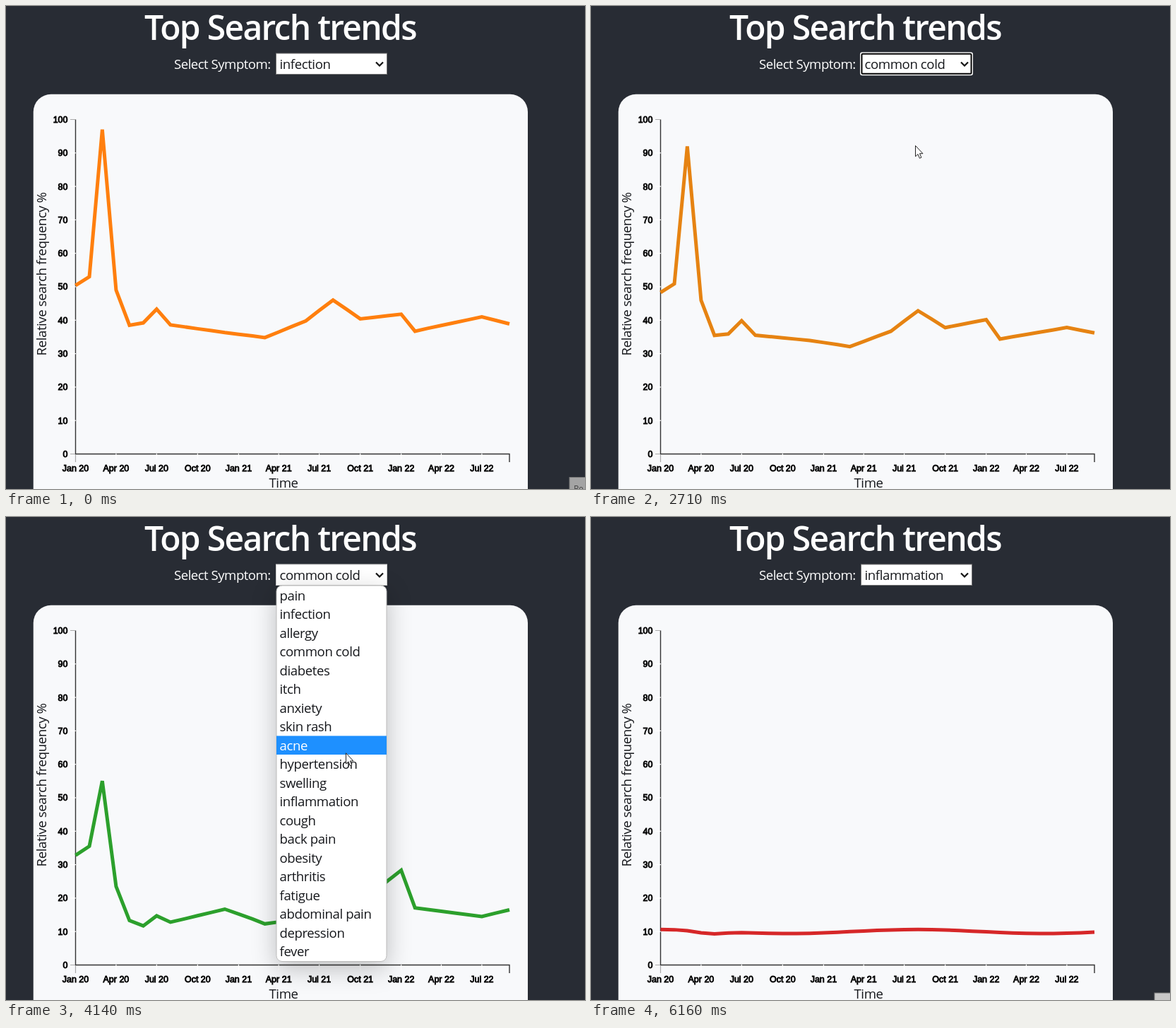
These frames come from a looping animation (820 by 683 pixels, 6.23 s). An HTML page:

```html
<!DOCTYPE html>
<html lang="en">
<head>
<meta charset="utf-8">
<title>Top Search trends</title>
<style>
  html, body { margin: 0; width: 100%; height: 100%; overflow: hidden; background: #282c34; }
  svg { display: block; width: 820px; height: 683px; }
  text { font: 18.6px "Open Sans", "Noto Sans", sans-serif; letter-spacing: -.4px; fill: #16181c; }
  .mid { text-anchor: middle; }
  .light { fill: #fff; }
  #title { font-size: 48px; font-weight: 600; letter-spacing: -1.7px; }
  #label { font-weight: 500; letter-spacing: -.5px; }
  .tick { font: 12.5px "Liberation Sans", Arial, sans-serif; letter-spacing: 0; fill: #000; stroke: #000; stroke-width: .85; }
  .axis { fill: none; stroke: #333; stroke-width: 1.4; }
  .faint { fill: none; stroke: #aaa; stroke-width: 1.2; }
  .notch { stroke: #fff; stroke-width: 1.2; }
  #menuBox { fill: #fff; stroke: #bbb; filter: drop-shadow(0 10px 17px rgba(0, 0, 0, .24)); }
</style>
</head>
<body>
<svg viewBox="0 0 820 683">
  <rect width="820" height="683" fill="#282c34"/>
  <text id="title" class="mid light" x="388.5" y="48">Top Search trends</text>
  <text id="label" class="light" x="238" y="89">Select Symptom:</text>
  <rect x="38.75" y="124.75" width="700.25" height="620" rx="25" fill="#f8f9fb"/>
  <path class="axis" d="M98.5 160.5V633.5H713V645"/>
  <path class="faint" d="M91 160.5H98M91 633.5H98M98.5 634V645"/>
  <g id="ticks"></g>
  <text class="mid" transform="translate(57 379) rotate(-90)">Relative search frequency %</text>
  <text class="mid" x="393" y="681">Time</text>
  <path id="line" fill="none" stroke-width="5"/>

  <rect id="select" x="382.5" y="67" width="157" height="29.5" fill="#fff"/>
  <g id="ring" fill="none">
    <rect x="381.75" y="66" width="158.5" height="31.5" rx="2.5" stroke="#fff" stroke-width="1.5"/>
    <rect x="383.5" y="67.7" width="155" height="28" rx="1.5" stroke="#101010" stroke-width="2"/>
  </g>
  <text id="choice" x="387.5" y="89"></text>
  <path d="M524 79.5l5 5 5-5" fill="none" stroke="#111" stroke-width="2.2"/>

  <g id="menu">
    <rect id="menuBox" x="383" y="97" width="156" height="531.5" rx="8"/>
    <rect id="hover" x="383" width="156" height="26.5" fill="#1e90ff"/>
    <g id="items"></g>
  </g>

  <g id="tip">
    <rect id="tipBox" width="40" height="30" stroke="#777"/>
    <text x="6" y="20" style="font-size:12px;fill:#444">Re</text>
  </g>
  <g id="pointer">
    <circle id="click" r="14" fill="#ff0" opacity=".6"/>
    <path d="M.5 .5V15.8L4 12.6 6.4 18.3 8.9 17.2 6.5 11.7H11Z" fill="#fff" stroke="#222"/>
  </g>
</svg>
<script>
const LOOP = 6230, ROW = 26.5, LIST_TOP = 97.5, MONTHS = 33;
const $ = id => document.getElementById(id);
const set = (id, name, value) => $(id).setAttribute(name, value);
const show = (id, on) => $(id).style.display = on ? '' : 'none';
const clamp = v => Math.max(0, Math.min(1, v));
const mix = (a, b, k) => a + (b - a) * k;
const within = (t, [a, b]) => t >= a && t < b;
const cubic = k => k < .5 ? 4 * k ** 3 : 1 - 4 * (1 - k) ** 3;
const smooth = k => k * k * (3 - 2 * k);

const symptoms = ['pain', 'infection', 'allergy', 'common cold', 'diabetes', 'itch', 'anxiety',
  'skin rash', 'acne', 'hypertension', 'swelling', 'inflammation', 'cough', 'back pain', 'obesity',
  'arthritis', 'fatigue', 'abdominal pain', 'depression', 'fever'];

// Curves turn at these months and run straight in between
const turns = [0, 1, 2, 3, 4, 5, 6, 7, 11, 14, 17, 19, 21, 24, 25, 30, 32];
const through = values => m => {
  const i = Math.max(1, turns.findIndex(turn => turn >= m));
  return mix(values[i - 1], values[i], (m - turns[i - 1]) / (turns[i] - turns[i - 1]));
};
const series = [
  { row: 1, rgb: [255, 127, 14], at: through(
    [50.4, 53, 97, 49, 38.5, 39.2, 43.3, 38.6, 36.3, 34.8, 39.8, 46, 40.4, 41.8, 36.7, 41, 38.9]) },
  { row: 3, rgb: [44, 160, 44], at: through(
    [32.8, 35.5, 55, 23.5, 13.3, 11.7, 14.7, 12.8, 16.7, 12.3, 14, 19.6, 18.7, 28.3, 17.1, 14.5, 16.5]) },
  { row: 11, rgb: [214, 39, 40],
    at: m => 10 + .6 * Math.cos(m / 3) - .9 * Math.exp(-((m - 3.7) ** 2) / 2) }
];

// Pointer glides: start, end, x, y
const glides = [[460, 460, 570, 268], [530, 530, 455, -8], [790, 1340, 452, 75], [1500, 2100, 459, 197],
  [3060, 3480, 499, 84], [3700, 4330, 476, 402], [5110, 5620, 725, 680]];
const clicks = [[1340, 1490], [2170, 2300], [3680, 3820], [4560, 4700]];
const menus = [[1490, 2440], [3680, 4830]];

const days = month => (Date.UTC(2020, month) - Date.UTC(2020, 0)) / 864e5;
const xAt = month => 98.5 + days(month) / days(MONTHS - 1) * 614.5;
const yAt = value => 633.5 - value * 4.73;

function buildTicks() {
  let out = '';
  for (let v = 0; v <= 100; v += 10) {
    const y = yAt(v);
    if (v % 100) out += `<path class="notch" d="M91 ${y}H99"/>`;
    out += `<text class="tick" text-anchor="end" x="87.5" y="${y + 4.4}">${v}</text>`;
  }
  for (let m = 0; m < MONTHS - 1; m += 3) {
    const x = xAt(m), name = ['Jan', 'Apr', 'Jul', 'Oct'][m / 3 % 4];
    if (m) out += `<path class="notch" d="M${x} 633V641"/>`;
    out += `<text class="tick mid" x="${x}" y="658">${name} ${20 + Math.floor(m / 12)}</text>`;
  }
  $('ticks').innerHTML = out;
}

function pointerAt(t) {
  let x = 0, y = 0;
  for (const [from, to, toX, toY] of glides) {
    if (t < from) break;
    const k = to > from ? smooth(clamp((t - from) / (to - from))) : 1;
    x = mix(x, toX, k);
    y = mix(y, toY, k);
  }
  return [x, y];
}

function drawLine(t) {
  const i = t < 4790 ? 0 : 1;
  const a = series[i], b = series[i + 1];
  const k = cubic(clamp((t - [2400, 4790][i]) / 1000));
  const points = Array.from({ length: MONTHS }, (_, m) =>
    `${xAt(m).toFixed(2)} ${yAt(mix(a.at(m), b.at(m), k)).toFixed(2)}`);
  set('line', 'd', 'M' + points.join('L'));
  set('line', 'stroke', `rgb(${a.rgb.map((c, n) => Math.round(mix(c, b.rgb[n], k)))})`);
}

function draw(t) {
  drawLine(t);
  const [x, y] = pointerAt(t);
  show('pointer', within(t, [460, 5560]));
  set('pointer', 'transform', `translate(${x} ${y})`);
  show('click', clicks.some(c => within(t, c)));

  const chosen = series[menus.filter(m => t >= m[1]).length].row;
  const open = menus.some(m => within(t, m));
  const over = x > 382 && x < 540 && y > 67 && y < 97;
  $('choice').textContent = symptoms[chosen];
  set('select', 'stroke', open || over ? '#ccc' : '#767676');
  show('ring', !open && within(t, [2440, 6090]));
  show('menu', open);
  const row = y < LIST_TOP ? chosen : Math.floor((y - LIST_TOP) / ROW);
  set('hover', 'y', LIST_TOP + row * ROW);
  [...$('items').children].forEach((item, i) => item.classList.toggle('light', i === row));

  const rising = t >= 6160;
  show('tip', rising || t < 70);
  set('tip', 'transform', `translate(798 ${rising ? 673 : 666.5})`);
  set('tipBox', 'fill', rising ? '#c8c8c8' : '#a4a4a4');
}

buildTicks();
$('items').innerHTML = symptoms.map((s, i) =>
  `<text x="387.5" y="${LIST_TOP + i * ROW + 20}">${s}</text>`).join('');

const start = performance.now();
function tick() {
  draw((performance.now() - start) % LOOP);
  requestAnimationFrame(tick);
}
tick();
</script>
</body>
</html>
```
